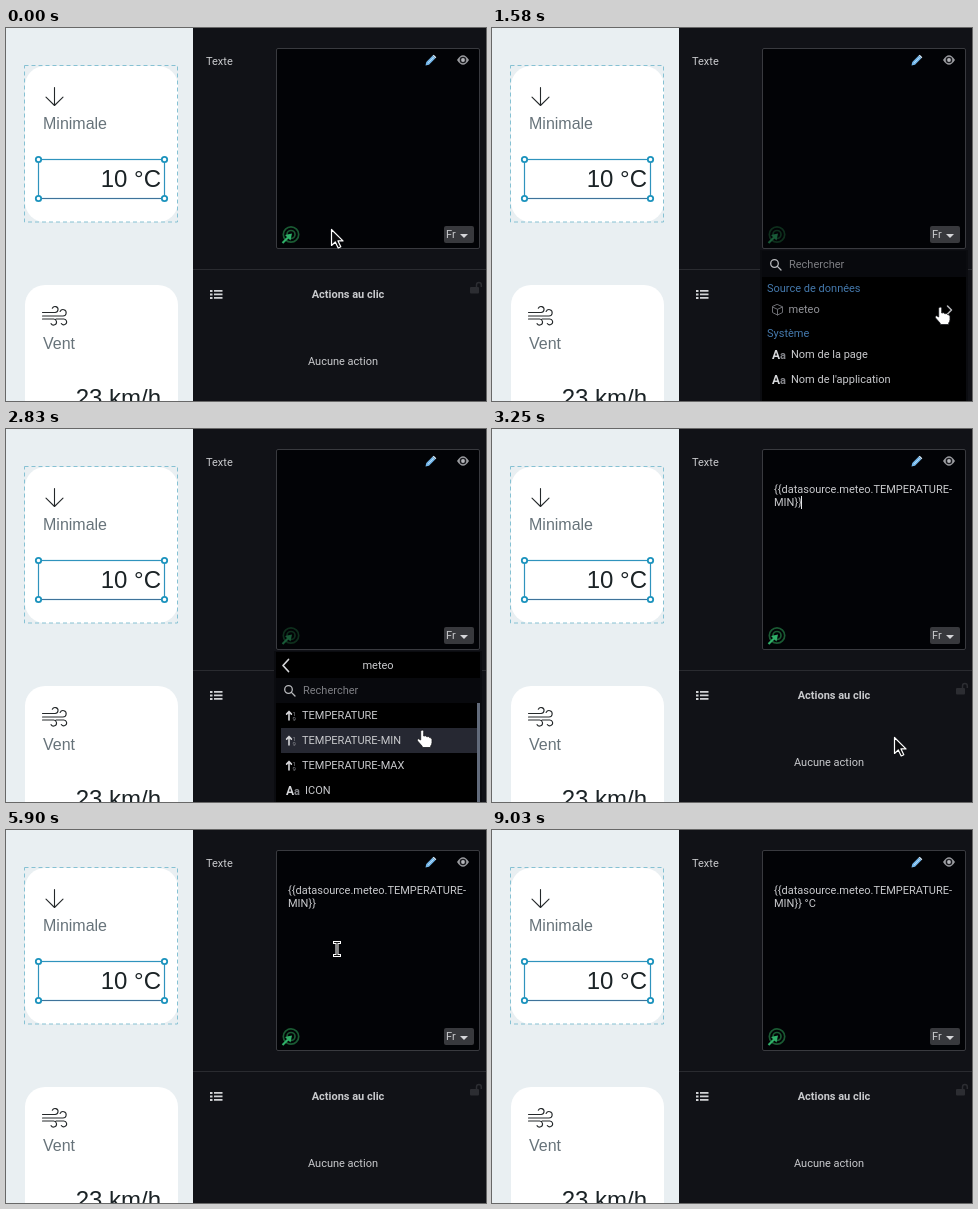
An HTML page for the animation above (9610 ms loop, 480 by 373 pixels).

```html
<!DOCTYPE html>
<html lang="fr">
<head>
<meta charset="utf-8">
<style>
  html, body { margin: 0; width: 100%; height: 100%; overflow: hidden; background: #111217; }
  svg { display: block; width: 100%; height: 100%; }
  text { font: 11px Roboto, sans-serif; fill: #c9cacd; white-space: pre; }
  .big { font: 24px "Liberation Sans", Arial, sans-serif; fill: #1b2326; text-anchor: end; }
  .label { font: 16px "Liberation Sans", Arial, sans-serif; fill: #67737a; }
  .mid { text-anchor: middle; }
  .bold { font-weight: 700; }
  .head { fill: #4478ab; }
  .dim { fill: #7d7e83; }
  .line { fill: none; stroke-linecap: round; stroke-linejoin: round; }
</style>
</head>
<body>
<svg viewBox="0 0 480 373">
  <defs>
    <g id="aa">
      <text class="bold" y="4.5" style="font-size:12px;fill:#d5d6d9">A</text>
      <text class="bold" x="8" y="4.5" style="font-size:11px;fill:#85868b">a</text>
    </g>
    <g id="num">
      <path class="line" d="M3 4.5V-4M.6-1.4L3-4l2.4 2.6" stroke="#d5d6d9" stroke-width="1.6"/>
      <text x="6.5" y="0" style="font-size:6px;fill:#898a90">1</text>
      <text x="6.5" y="5.5" style="font-size:6px;fill:#898a90">9</text>
    </g>
    <g id="loupe" class="line" stroke="#b9babd" stroke-width="1.3">
      <circle cx="4.5" cy="4.5" r="3.8"/><path d="M7.4 7.4L11 11"/>
    </g>
  </defs>

  <!-- page preview -->
  <rect width="187" height="373" fill="#e9eff2"/>
  <rect x="19" y="38" width="153" height="156" rx="20" fill="#fff"/>
  <rect x="18.5" y="37.5" width="153" height="156.5" fill="none" stroke="#86c1d3" stroke-dasharray="4 3"/>
  <path class="line" d="M48.5 59.5V77.5M40 69.2l8.5 8.3 8.5-8.3" stroke="#24282a" stroke-width="1.1"/>
  <text class="label" x="37" y="101">Minimale</text>
  <text class="big" x="155" y="159">10 °C</text>
  <rect x="32.5" y="131.5" width="126" height="39" fill="none" stroke="#2f93bd" stroke-width="1.2"/>
  <path d="M35 170.5H156" stroke="#3f739a" stroke-width="1.2"/>
  <g id="handles" fill="#fff" stroke="#1c93bd" stroke-width="1.8"></g>
  <rect x="19" y="257" width="153" height="150" rx="20" fill="#fff"/>
  <path class="line" d="M36.5 284.5h12.5a3 3 0 1 0-2.7-4.2M36.5 288h20.5a3.2 3.2 0 1 0-2.9-4.6M36.5 291h10.800a3 3 0 1 1-2.300 4.600M50 291h7.500a2.900 2.900 0 1 1-2.200 4.500" stroke="#24282a" stroke-width="1.1"/>
  <text class="label" x="37" y="321">Vent</text>
  <text class="big" x="155" y="378">23 km/h</text>

  <!-- settings panel -->
  <text x="200" y="37">Texte</text>
  <rect x="270.500" y="20.500" width="203" height="200" rx="1.500" fill="#020306" stroke="#393a3f"/>
  <g transform="translate(419.500 26.500)">
    <path d="M0 11l.8-3.500L7.200 1.100 9.900 3.800 3.500 10.200z" fill="#74b7ea"/>
    <path d="M7.200 1.100L8.200.3 10.800 2.800 9.900 3.800z" fill="#d9ecfa"/>
    <path d="M2.500 8.500L8.300 2.700" stroke="#c6e3f8" stroke-width=".8"/>
  </g>
  <path d="M451 32q6-9.500 12 0q-6 9.500-12 0z" fill="#9b9ca0"/>
  <circle cx="457" cy="32" r="3.300" fill="#1b1c20"/>
  <circle cx="457" cy="32" r="1.900" fill="#b5b6ba"/>
  <g id="target">
    <g fill="none" stroke="#1a5a33" stroke-width="1.700">
      <circle cx="285" cy="206.500" r="7.700"/><circle cx="285" cy="206.500" r="4"/>
    </g>
    <path d="M276.500 215L282 209.500" stroke="#2fb069" stroke-width="2.200"/>
    <path d="M286 205.500l-1.500 7-5.500-5.500z" fill="#2fb069"/>
  </g>
  <rect x="438" y="198" width="30" height="17" rx="2" fill="#38393d"/>
  <text x="440" y="210">Fr</text>
  <path d="M454 206h8l-4 4z" fill="#d5d6d9"/>
  <path d="M187 241.500H480" stroke="#2a2b30"/>
  <g fill="#d2d3d6">
    <path d="M204 262h2.500v2h-2.500zM204 265.500h2.500v2h-2.500zM204 269h2.500v2h-2.500z"/>
    <path d="M208 262h8.500v1.700h-8.500zM208 265.500h8.500v1.700h-8.500zM208 269h8.500v1.700h-8.500z"/>
  </g>
  <text class="mid bold" x="342" y="270">Actions au clic</text>
  <rect x="464" y="259" width="9" height="6.500" rx="1" fill="#2c2d32"/>
  <path d="M470.500 259v-2a2.400 2.400 0 0 1 4.800 0v2" fill="none" stroke="#2c2d32" stroke-width="1.500"/>
  <text class="mid" x="337" y="337">Aucune action</text>

  <text id="line1" x="282" y="64">{{datasource.meteo.TEMPERATURE-</text>
  <text id="line2" x="282" y="77"></text>
  <rect id="caret" y="67" width="1" height="13" fill="#e4e5e8"/>

  <!-- drop-down -->
  <g id="menu">
    <rect x="268" y="222" width="208" height="160" fill="#0b0c10"/>
    <rect x="270" y="223" width="204" height="160" fill="#000"/>
    <g id="root">
      <rect x="270" y="223" width="204" height="26" fill="#08090d"/>
      <use href="#loupe" x="278" y="231"/>
      <text class="dim" x="297" y="240">Rechercher</text>
      <text class="head" x="275" y="264">Source de données</text>
      <path class="line" d="M285.500 276.500l5 2.300v5.700l-5 2.500-5-2.500v-5.700zM280.500 279l5 2.300 5-2.300M285.500 281.500v5.500" stroke="#6c6d72"/>
      <text class="dim" x="296.500" y="285" style="fill:#929398">meteo</text>
      <path class="line" d="M455.500 278l4 4-4 4" stroke="#b9babd" stroke-width="1.500"/>
      <text class="head" x="275" y="309">Système</text>
      <use href="#aa" x="280" y="326.500"/>
      <text x="299" y="330">Nom de la page</text>
      <use href="#aa" x="280" y="351.500"/>
      <text x="299" y="355">Nom de l'application</text>
      <text class="bold" x="281" y="381">#</text>
      <text x="295" y="381">Date/heure actuelle</text>
    </g>
    <g id="sub">
      <path class="line" d="M282.500 230.500l-5.500 6 5.500 6" stroke="#d5d6d9" stroke-width="1.700"/>
      <text class="mid" x="372" y="240">meteo</text>
      <rect x="270" y="249" width="204" height="25" fill="#08090d"/>
      <use href="#loupe" x="278" y="256"/>
      <text class="dim" x="297" y="265">Rechercher</text>
      <rect id="find" x="297" y="255" width="1" height="13" fill="#e4e5e8"/>
      <rect id="hover" x="275" width="196" height="25" fill="#262832"/>
      <use href="#num" x="280" y="286.500"/>
      <text x="296" y="290">TEMPERATURE</text>
      <use href="#num" x="280" y="311.500"/>
      <text x="296" y="315">TEMPERATURE-MIN</text>
      <use href="#num" x="280" y="336.500"/>
      <text x="296" y="340">TEMPERATURE-MAX</text>
      <use href="#aa" x="280" y="361.500"/>
      <text x="299" y="365">ICON</text>
      <rect x="471" y="274" width="3" height="99" fill="#626b7b"/>
    </g>
  </g>

  <g id="cursor">
    <path id="arrow" d="M.5.500V16.500L4.300 13l2.900 6 2.600-1.200-2.800-5.900H12z" fill="#0b0b0d" stroke="#fff" stroke-width="1.200" stroke-linejoin="round"/>
    <path id="hand" d="M-1.300 10V1.500a1.500 1.500 0 0 1 3 0V6q2.600-.8 3 .7 2.400-.6 2.900.9 2.400-.2 2.400 2v3q0 2-1.300 3.400v1.500H.2v-1.300L-4.600 10.800q-.6-1.900 1.300-2z" fill="#fff" stroke="#17181c" stroke-width=".8"/>
    <g id="beam" fill="none">
      <path d="M-4-6.500H4M-4 6.500H4M0-7V7" stroke="#fff" stroke-width="3"/>
      <path d="M-3-6.500H3M-3 6.500H3M0-6V6" stroke="#111" stroke-width="1"/>
    </g>
  </g>
</svg>
<script>
const LOOP = 9610;
const $ = id => document.getElementById(id);
const show = (id, on) => $(id).setAttribute('display', on ? 'inline' : 'none');

// pointer moves: start, end, number of steps, from, to
const moves = [
  [400, 500, 4, [325, 201], [281, 203]],
  [1230, 1630, 8, [281, 203], [455, 282]],
  [2600, 2950, 6, [455, 282], [402, 308]],
  [3500, 3850, 5, [402, 308], [388, 203]],
  [4300, 4600, 6, [388, 203], [331, 119]]
];
// text caret: time, x (0 = hidden)
const blinks = [[0, 0], [3250, 309], [3850, 0], [4420, 309], [5050, 0], [5300, 312], [5900, 0],
  [6480, 312], [6630, 316], [7250, 323], [7830, 0], [8450, 323], [9030, 0]];
const typed = [[0, ''], [3250, 'MIN}}'], [5300, 'MIN}} '], [6630, 'MIN}} °'], [7250, 'MIN}} °C']];

const at = (list, t) => list.filter(e => e[0] <= t).pop()[1];
const ease = p => p * p * (3 - 2 * p);
const mix = (a, b, p) => a.map((v, i) => v + (b[i] - v) * p);

function pointer(t) {
  if (t >= 8450) return mix([331, 119], [224, 66], Math.floor((t - 8450) / 60) / 2);
  let pos = moves[0][3];
  for (const [start, end, n, from, to] of moves) {
    if (t < start) break;
    const step = Math.min(n, 1 + Math.floor((t - start) / (end - start) * (n - 1) + 1e-6));
    pos = mix(from, to, ease(step / n));
  }
  return pos;
}

function shape(t, y) {
  if (t >= 8450) return 'arrow';
  if (t >= 4300) return y < 196 ? 'beam' : 'arrow';
  if (t >= 500 && t < 880) return 'hand';
  return t >= 1230 && t < 3250 && y > 271 ? 'hand' : 'arrow';
}

function draw(t) {
  const [x, y] = pointer(t);
  const kind = shape(t, y);
  ['arrow', 'hand', 'beam'].forEach(id => show(id, id === kind));
  show('cursor', t < 8630);
  $('cursor').setAttribute('transform', `translate(${Math.round(x)} ${Math.round(y)})`);

  show('menu', t >= 880 && t < 3250);
  show('root', t < 2000);
  show('sub', t >= 2000);
  show('find', t < 2600);
  $('hover').setAttribute('y', y < 299 ? 274 : 299);
  $('target').setAttribute('opacity', t >= 500 && t < 3250 ? 0.5 : 1);

  const caret = at(blinks, t);
  show('line1', t >= 3250);
  $('line2').textContent = at(typed, t);
  show('caret', caret > 0);
  $('caret').setAttribute('x', caret);
}

$('handles').innerHTML = [32.5, 158.5].flatMap(x =>
  [131.5, 170.5].map(y => `<circle cx="${x}" cy="${y}" r="2.700"/>`)).join('');

const begin = performance.now();
function frame() {
  draw((performance.now() - begin) % LOOP);
  requestAnimationFrame(frame);
}
frame();
</script>
</body>
</html>
```
